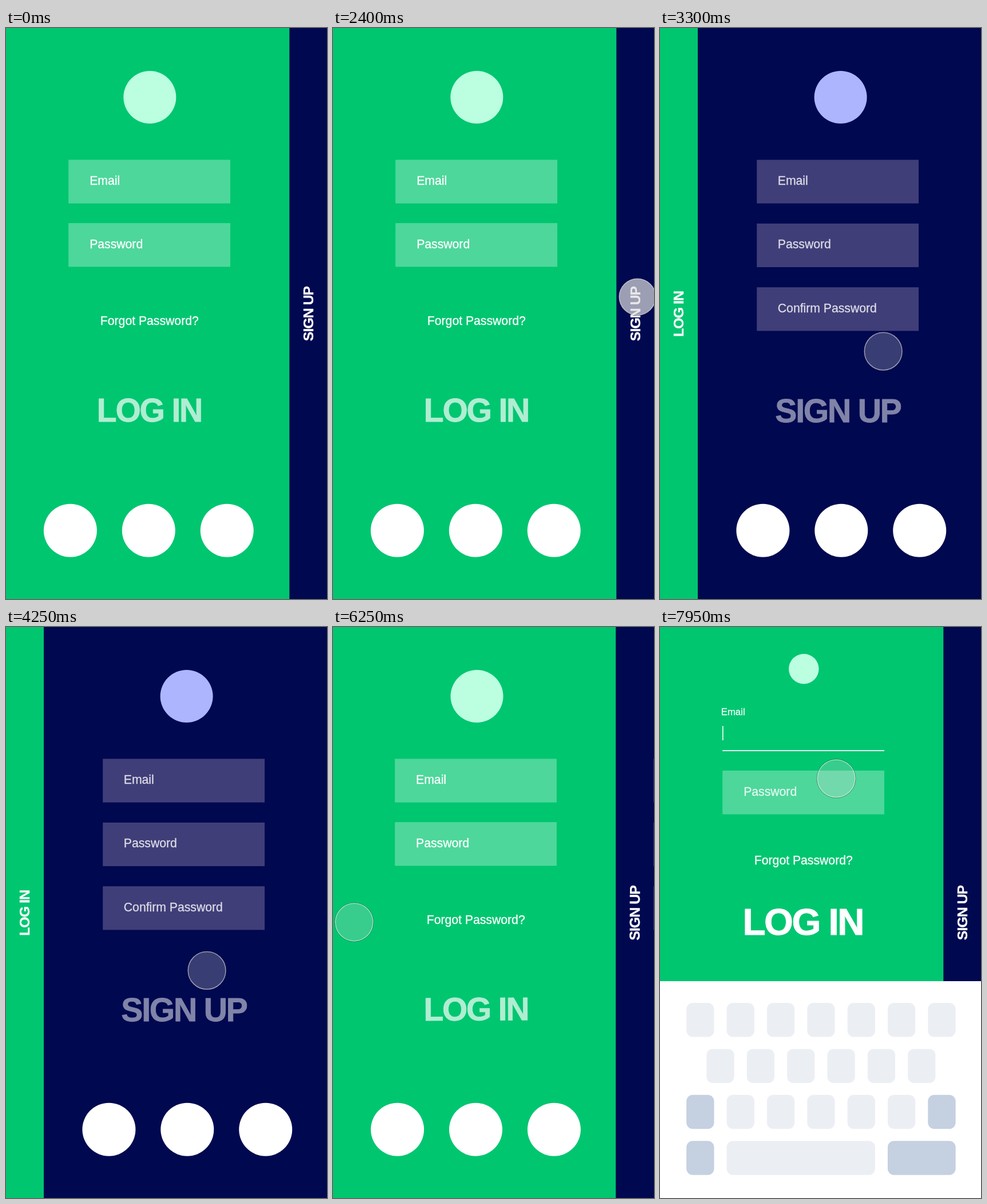
These frames come from a looping animation (561x998 px, 8 s). An HTML page:

```html
<!DOCTYPE html>
<html lang="en">
<head>
<meta charset="utf-8">
<title>Log in / sign up</title>
<style>
  html, body { margin: 0; width: 100%; height: 100%; overflow: hidden; background: #000850; }
  svg { display: block; width: 100vw; height: 100vh; }
  text {
    font-family: "Liberation Sans", Helvetica, Arial, sans-serif; font-size: 21.2px;
    fill: #fff; stroke: #fff; stroke-width: .015em;
  }
  .title { font-weight: bold; text-anchor: middle; letter-spacing: -.038em; }
</style>
</head>
<body>
<svg id="stage" viewBox="0 0 561 998" preserveAspectRatio="none">
  <rect width="561" height="998" fill="#000850"/>
  <rect id="green" height="998" fill="#00c670"/>

  <g id="loginForm">
    <rect id="emailBox" x="109.2" width="282.8" fill="#fff"/>
    <rect id="caret" x="109" y="173" width="1.6" height="25" fill="#fff"/>
    <text id="emailLabel">Email</text>
    <g id="passRow">
      <rect x="109.2" y="341" width="282.8" height="76.4" fill="#fff" fill-opacity=".3"/>
      <text id="passLabel" x="146.2" y="385">Password</text>
    </g>
    <text id="forgot" x="250.8" text-anchor="middle">Forgot Password?</text>
  </g>

  <g id="signupForm"></g>
  <circle id="logo"/>
  <g id="socials" fill="#fff"></g>
  <text id="login" class="title">LOG IN</text>
  <text id="signup" class="title">SIGN UP</text>
  <g id="keyboard"><rect y="619" width="561" height="420" fill="#fff"/></g>

  <g id="pointer">
    <circle id="shade" fill="none" stroke="#000" stroke-opacity=".4" stroke-width="1"/>
    <circle id="disc" fill="#dfdfdf" stroke="#fff" stroke-opacity=".55" stroke-width="1.5"/>
  </g>
</svg>
<script>
const LOOP = 8000, STEP = 50;
const TO_SIGNUP = 2500, TO_LOGIN = 5950, TO_TYPING = 7450;

const el = {};
document.querySelectorAll('[id]').forEach(e => { el[e.id] = e; });

const set = (e, attrs) => { for (const k in attrs) e.setAttribute(k, attrs[k]); };
const add = (parent, tag, attrs, label) => {
  const e = document.createElementNS('http://www.w3.org/2000/svg', tag);
  set(e, attrs);
  if (label) e.textContent = label;
  parent.appendChild(e);
  return e;
};
const shift = (e, x, y) => set(e, { transform: `translate(${x} ${y})` });
const mix = (a, b, p) => a + (b - a) * p;
const mixAll = (a, b, p) => a.map((v, i) => mix(v, b[i], p));
const progress = (t, start, length) => Math.min(1, Math.max(0, (t - start) / length));
const easeOut = u => 1 - (1 - u) ** 3.06;
const easeInOut = u => 1 - (1 - u ** 1.63) ** 3;

// Sign-up fields and social buttons
const signupTexts = ['Email', 'Password', 'Confirm Password'].map((label, i) => {
  const y = 230.4 + 111.4 * i;
  add(el.signupForm, 'rect', { x: 169.2, y, width: 282.8, height: 76.2, fill: '#403e78' });
  return add(el.signupForm, 'text', { x: 205.8, y: y + 43.6 }, label);
});
for (let i = 0; i < 3; i++) add(el.socials, 'circle', { cx: 112.4 + 136.9 * i, cy: 878.2, r: 46.5 });

// Keyboard: column and row on an even grid, width in keys
const PITCH = 70.35;
const key = (col, row, span, dark) => add(el.keyboard, 'rect', {
  x: 46.2 + col * PITCH, y: 657 + row * 80.4,
  width: 48.3 + (span - 1) * PITCH, height: 59.5, rx: 11,
  fill: dark ? '#c5d0e1' : '#ebeff4'
});
for (let i = 0; i < 7; i++) {
  key(i, 0, 1);
  if (i < 6) key(i + .5, 1, 1);
  key(i, 2, 1, i % 6 === 0);
}
key(0, 3, 1, true);
key(1, 3, 4);
key(5, 3, 2, true);

// Each move bends from the last place past "via" to "to"
const START = [460, -45];
const MOVES = [
  { at: 850, length: 920, via: [564, 212], to: [532, 470] },
  { at: 2950, length: 900, via: [340, 590], to: [359, 602.5] },
  { at: 4200, length: 900, via: [211, 563], to: [62.5, 523.5] },
  { at: 5550, length: 300, via: [50, 520], to: [37, 516] },
  { at: 6450, length: 850, via: [386, 120], to: [308, 264.8] }
];
const pointerAt = t => MOVES.reduce((from, { at, length, via, to }) => {
  const p = easeInOut(progress(t, at, length));
  return mixAll(mixAll(from, via, p), mixAll(via, to, p), p);
}, START);
const isPressed = t => [TO_SIGNUP, TO_LOGIN, TO_TYPING].some(s => t >= s - 100 && t <= s);

// Title poses: x, y, angle, size, opacity
const LOGIN_BIG = [251.5, 668.3, 0, 57, .69];
const LOGIN_SIDE = [32, 499.5, -90, 24.8, 1];
const LOGIN_ACTIVE = [251, 515, 0, 65.4, 1];
const SIGNUP_SIDE = [528, 499, -90, 24.8, 1];
const SIGNUP_BIG = [312, 669.8, 0, 57, .5];

function pose(e, [x, y, angle, size, opacity]) {
  set(e, {
    transform: `translate(${x} ${y}) rotate(${angle})`,
    x: -.019 * size, y: .345 * size, opacity
  });
  e.style.fontSize = size + 'px';
}

function draw(time) {
  const t = Math.floor(time / STEP) * STEP;
  const side = easeOut(progress(t, TO_SIGNUP, 350)) - easeOut(progress(t, TO_LOGIN, 350));
  const typing = easeOut(progress(t, TO_TYPING, 500));

  set(el.green, { width: mix(495.3, 66, side) });
  shift(el.loginForm, -422 * side, 0);
  shift(el.signupForm, 392 * (1 - side), 0);
  shift(el.socials, 67.5 * side, 0);
  signupTexts.forEach(e => set(e, { opacity: .82 * side }));

  const tint = mixAll([187, 255, 224], [173, 181, 255], side).map(Math.round);
  set(el.logo, {
    cx: mix(251.3, 315.6, side), cy: mix(121, 73.2, typing),
    r: mix(46, 26.3, typing), fill: `rgb(${tint})`
  });

  pose(el.login, mixAll(mixAll(LOGIN_BIG, LOGIN_SIDE, side), LOGIN_ACTIVE, typing));
  pose(el.signup, mixAll(SIGNUP_SIDE, SIGNUP_BIG, side));

  set(el.emailBox, {
    y: mix(230.4, 215.2, typing), height: mix(76.2, 1.8, typing),
    'fill-opacity': mix(.3, 1, typing)
  });
  set(el.emailLabel, { x: mix(146.2, 106.7, typing), y: mix(274.2, 154, typing) });
  el.emailLabel.style.fontSize = mix(21.2, 16.8, typing) + 'px';
  set(el.caret, { opacity: typing });
  shift(el.passRow, 0, -90 * typing);
  set(el.passLabel, { opacity: mix(1, .85, typing) });
  set(el.forgot, { y: mix(519.3, 414.7, typing) });
  shift(el.keyboard, 0, 380 * (1 - typing));

  const pressed = isPressed(t), r = pressed ? 31.8 : 32.9;
  shift(el.pointer, ...pointerAt(t));
  set(el.disc, { r, 'fill-opacity': pressed ? .7 : .25 });
  set(el.shade, { r: r + 1 });
}

const begin = performance.now();
function tick() {
  draw((performance.now() - begin) % LOOP);
  requestAnimationFrame(tick);
}
tick();
</script>
</body>
</html>
```
